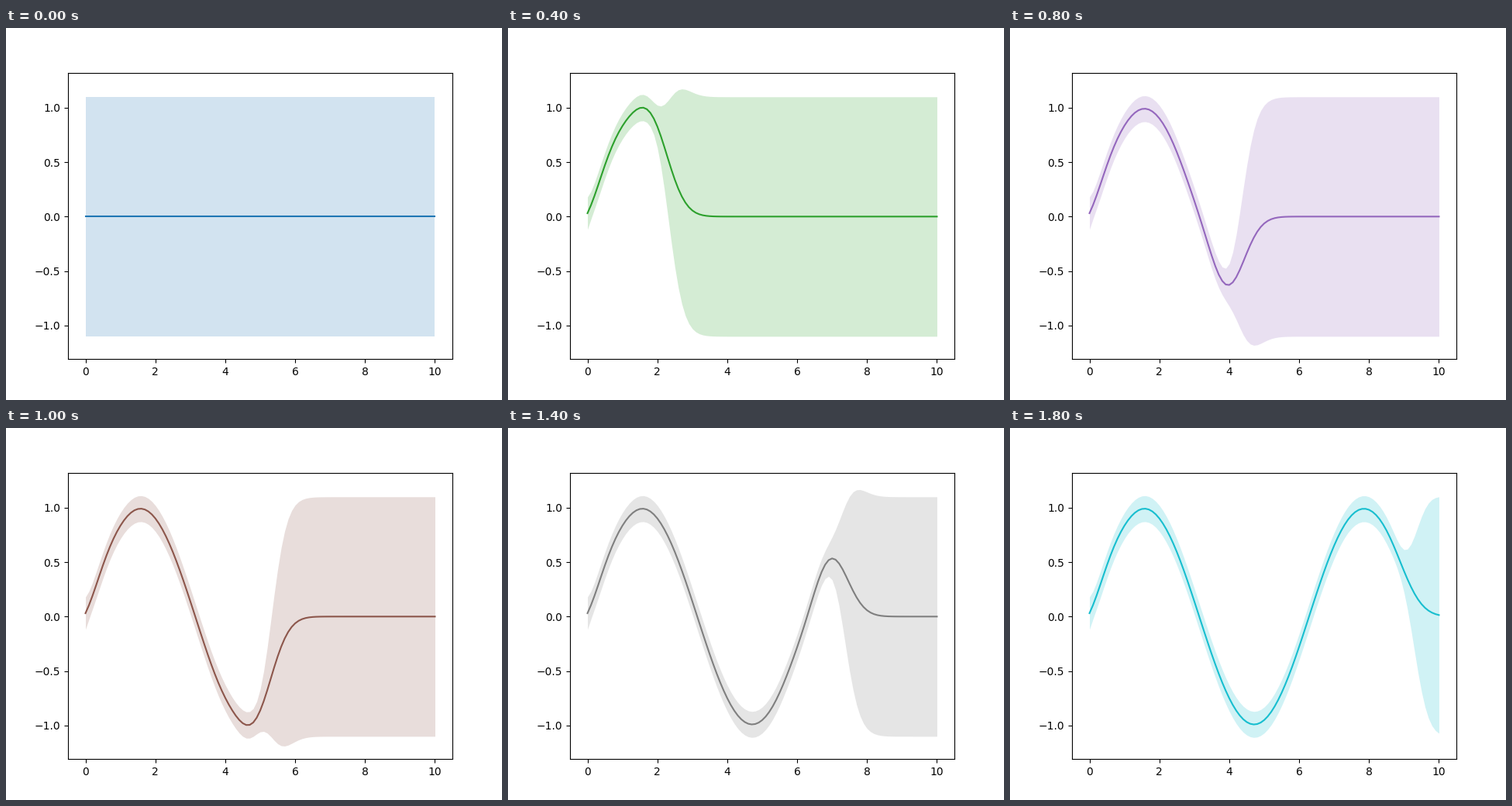
A matplotlib script that plays this animation: 640x480 px, repeating every 2 s.

```python
import matplotlib.pyplot as plt
import numpy as np
from matplotlib.animation import ArtistAnimation

STEPS = 10
BATCH = 10
NOISE = 0.1
LENGTH = 0.5


def kernel(a, b):
    return np.exp(-0.5 * ((a[:, None] - b[None, :]) / LENGTH) ** 2)


def predict(x, y, grid):
    """Gaussian process mean and predictive variance on the grid."""
    cross = kernel(grid, x)
    gain = np.linalg.solve(kernel(x, x) + NOISE * np.eye(len(x)), cross.T).T
    return gain @ y, 1 + NOISE - np.sum(gain * cross, axis=1)


grid = np.linspace(0, 10, 101)
x = np.arange(STEPS * BATCH) * 0.1
y = np.sin(x)

fig, ax = plt.subplots(figsize=(6.4, 4.8), dpi=100)
frames = []
for step in range(STEPS):
    n = step * BATCH
    mean, var = predict(x[:n], y[:n], grid)
    color = f"C{step}"
    line, = ax.plot(grid, mean, color=color)
    band = ax.fill_between(grid, mean - var, mean + var, color=color,
                           alpha=0.2, linewidth=0)
    frames.append([band, line])

anim = ArtistAnimation(fig, frames, interval=200, repeat=True, repeat_delay=0)
plt.show()
```
